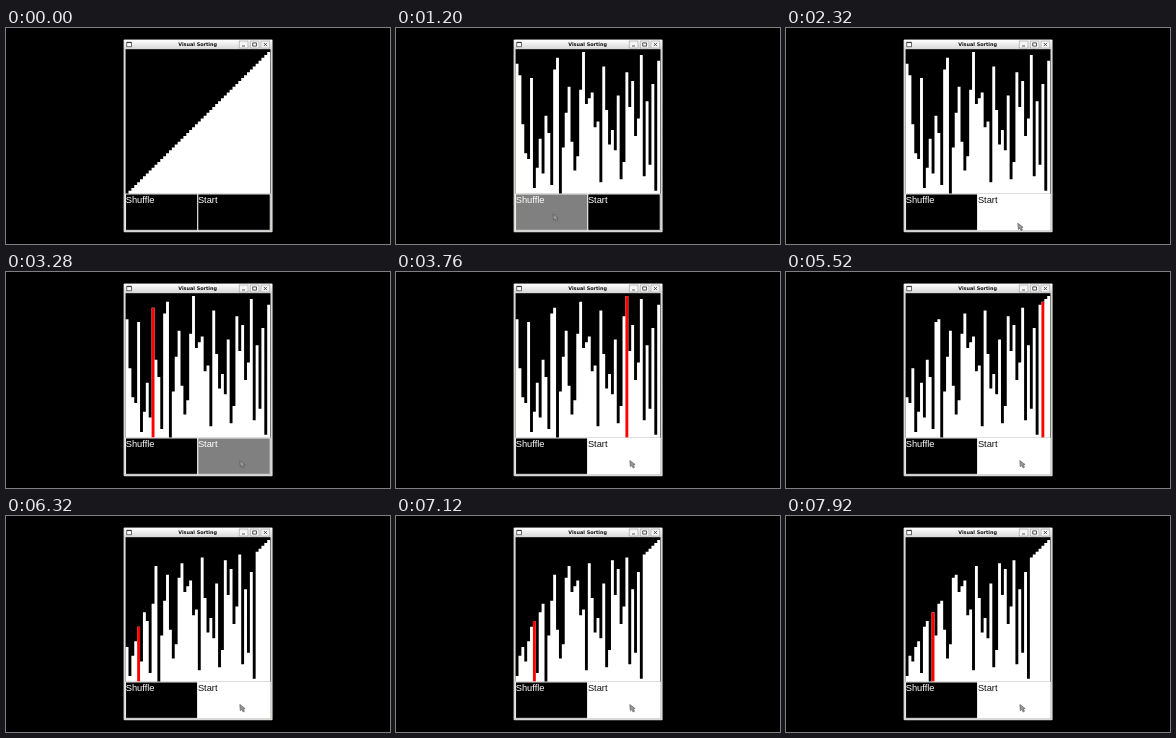
An HTML page that plays this animation: 384x216 px, repeating every 8000 ms.

```html
<!DOCTYPE html>
<html lang="en">
<head>
<meta charset="utf-8">
<title>Visual Sorting</title>
<style>
  html, body { margin: 0; width: 100%; height: 100%; overflow: hidden; background: #000; }
  svg { display: block; width: 100vw; height: 100vh; }
  .title { font: bold 4.9px "DejaVu Sans", sans-serif; fill: #111; text-anchor: middle; }
  .label { font: 9.3px "Liberation Sans", Arial, sans-serif; }
  .control { fill: #f4f4f4; stroke: #999; stroke-width: .6; }
  .glyph { fill: none; stroke: #333; stroke-width: .8; }
</style>
</head>
<body>
<svg viewBox="0 0 384 216">
  <defs>
    <linearGradient id="bar" x2="0" y2="1">
      <stop offset="0" stop-color="#fff"/>
      <stop offset="1" stop-color="#d6d6d6"/>
    </linearGradient>
  </defs>
  <rect width="384" height="216"/>
  <rect x="117.6" y="11.6" width="149" height="192.6" rx="1" fill="#d8d8d4"/>
  <rect x="118.2" y="12" width="147.8" height="9.2" fill="url(#bar)"/>
  <rect x="120.8" y="14.2" width="4.6" height="4.6" fill="#fff" stroke="#333" stroke-width=".7"/>
  <path d="M120.8 14.6h4.6" stroke="#333" stroke-width="1"/>
  <text class="title" x="191.6" y="18.4">Visual Sorting</text>
  <g class="control">
    <rect x="233.2" y="13" width="8.8" height="7"/>
    <rect x="244.2" y="13" width="8.8" height="7"/>
    <rect x="255" y="13" width="8.8" height="7"/>
  </g>
  <path class="glyph" d="M236 18h3M246.7 14.9h3.8v3.2h-3.8zM257.8 14.9l3.2 3.2m0-3.2l-3.2 3.2"/>
  <rect x="119.6" y="21.2" width="144.9" height="181.6"/>
  <path id="bars" fill="#fff"/>
  <path id="active" fill="#f00"/>
  <g stroke="#fff" stroke-width=".9">
    <rect id="shuffleBox" x="119.6" y="166" width="72.2" height="36.3"/>
    <rect id="startBox" x="191.8" y="166" width="72.4" height="36.3"/>
  </g>
  <text id="shuffleText" class="label" x="119.7" y="175">Shuffle</text>
  <text id="startText" class="label" x="191.9" y="175">Start</text>
  <path id="cursor" d="M0 0L.5 6.2L2 5L3.3 7.5L4.7 6.8L3.5 4.4L5.3 4z"
        fill="#999" stroke="#555" stroke-width=".6"/>
</svg>
<script>
const LOOP = 8000, TICK = 80, COUNT = 50;
const LEFT = 119.6, FLOOR = 165.7, UNIT = 2.89;
const SORTED = Array.from({ length: COUNT }, (_, i) => i);
const SHUFFLED = [
  45, 41, 24, 14, 12, 40, 2, 9, 19, 7, 27, 21, 3, 43, 47, 0, 16, 28, 37, 18, 8, 13, 36, 49, 31,
  33, 35, 23, 25, 4, 44, 29, 17, 22, 15, 34, 5, 11, 42, 30, 39, 20, 26, 48, 6, 32, 10, 38, 1, 46
];
// [time, comparisons done]
const PACE = [[3120, 0], [3760, 38], [3920, 50], [4720, 99], [5520, 144], [6320, 194], [7920, 288]];
// [time, x, y] of the pointer tip
const POINTER = [[240, 158, 206], [560, 157, 186], [1840, 157, 186], [2080, 196, 208],
  [2320, 231.8, 195.2], [2720, 233.8, 188.5]];

const el = id => document.getElementById(id);

function track(keys, time, column) {
  if (time <= keys[0][0]) return keys[0][column];
  const next = keys.findIndex(key => key[0] > time);
  if (next < 0) return keys[keys.length - 1][column];
  const a = keys[next - 1], b = keys[next];
  return a[column] + (b[column] - a[column]) * (time - a[0]) / (b[0] - a[0]);
}

function bubble(values, steps) {
  const list = values.slice();
  let active = -1;
  for (let end = COUNT - 1; end > 0 && steps > 0; end--) {
    for (let j = 0; j < end && steps > 0; j++, steps--) {
      if (list[j] > list[j + 1]) [list[j], list[j + 1]] = [list[j + 1], list[j]];
      active = j + 1;
    }
  }
  return { list, active };
}

function paintButton(name, hover, pressed) {
  el(name + "Box").setAttribute("fill", pressed ? "#808080" : hover ? "#fff" : "#000");
  el(name + "Text").setAttribute("fill", hover && !pressed ? "#111" : "#fff");
}

function render(now) {
  const time = Math.floor(now % LOOP / TICK) * TICK;
  const steps = Math.floor(track(PACE, time, 1) + 1e-6);
  const { list, active } = bubble(time < 1200 ? SORTED : SHUFFLED, steps);

  const outline = list.map((v, i) =>
    `V${FLOOR - v * UNIT}H${LEFT + (i + 1) * UNIT}`).join("");
  el("bars").setAttribute("d", `M${LEFT} ${FLOOR}${outline}V${FLOOR}z`);
  el("active").setAttribute("d", active < 0 ? "" :
    `M${LEFT + active * UNIT} ${FLOOR}v${-list[active] * UNIT}h${UNIT}V${FLOOR}z`);

  const x = track(POINTER, time, 1), y = track(POINTER, time, 2);
  const shown = time >= 240, inside = shown && y < 202;
  paintButton("shuffle", inside && x < 191.8, time >= 1200 && time < 1440);
  paintButton("start", inside && x >= 191.8, time >= 3120 && time < 3360);
  el("cursor").setAttribute("transform", `translate(${x} ${y})`);
  el("cursor").setAttribute("visibility", shown ? "visible" : "hidden");
}

const begin = performance.now();
function loop() {
  render(performance.now() - begin);
  requestAnimationFrame(loop);
}
loop();
</script>
</body>
</html>
```
